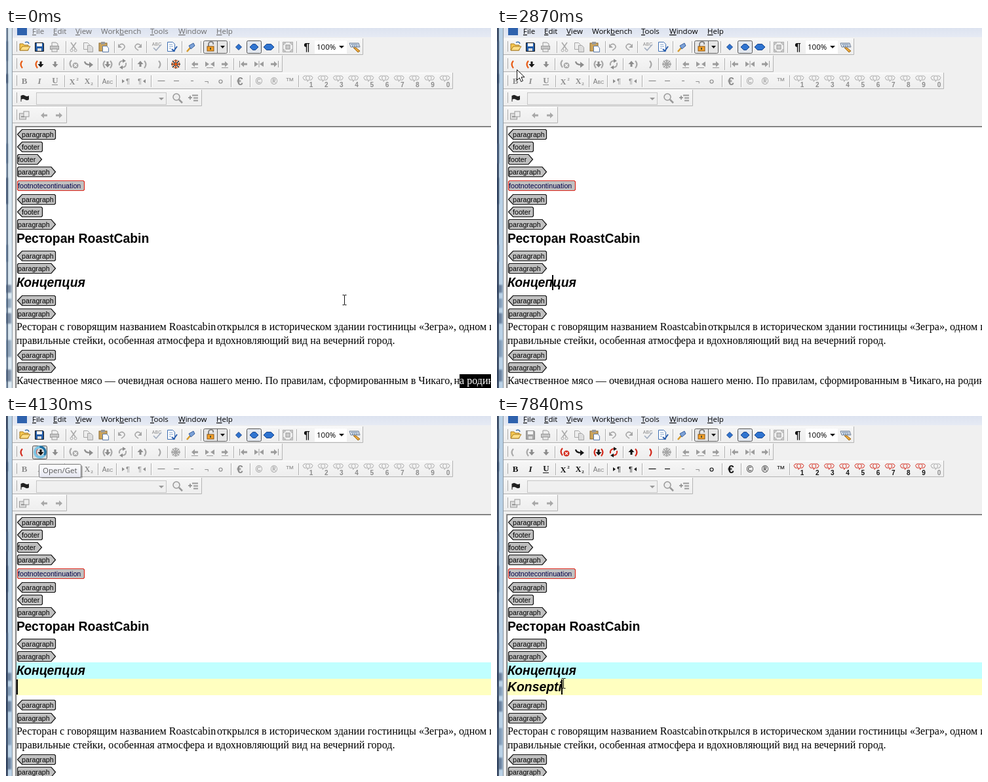
These frames come from a looping animation (740x548 px, 8000 ms). An HTML page:

```html
<!DOCTYPE html>
<html lang="ru">
<head>
<meta charset="utf-8">
<title>Editor</title>
<style>
html, body { margin: 0; width: 100%; height: 100%; overflow: hidden; background: #f0f0f0; }
svg { display: block; width: 740px; height: 548px; }
text { white-space: pre; }
.ui { font-family: "Open Sans", "Noto Sans", sans-serif; font-size: 11.5px; }
.sans { font-family: "Liberation Sans", Arial, sans-serif; }
.serif { font-family: "Liberation Serif", "Times New Roman", serif; font-size: 16.08px; }
.head { font-size: 19.4px; font-weight: bold; }
.on { --k: #151515; --c: #d32a1c; --o: #e85a13; --b: #245da8; }
.off { --k: #8c8c8c; --c: #a8a8a8; --o: #a8a8a8; --b: #a6a6a6; }
</style>
</head>
<body>
<svg id="stage" viewBox="0 0 740 548"></svg>
<script>
const LOOP = 8000, STEP = 70;
const K = 'var(--k)', C = 'var(--c)', O = 'var(--o)', B = 'var(--b)';

const rect = (x, y, w, h, fill, more = '') => `<rect x="${x}" y="${y}" width="${w}" height="${h}" fill="${fill}" ${more}/>`;
const path = (d, fill = 'none', stroke = 'none', w = 1, more = '') =>
  `<path d="${d}" fill="${fill}" stroke="${stroke}" stroke-width="${w}" ${more}/>`;
const text = (x, y, s, cls = 'ui', more = '') => `<text x="${x}" y="${y}" class="${cls}" ${more}>${s}</text>`;
const glyph = (x, y, s, size, fill = K, more = '') =>
  text(x, y, s, 'sans', `font-size="${size}" fill="${fill}" text-anchor="middle" ${more}`);
const at = (x, y, body, more = '') => `<g transform="translate(${x} ${y})" ${more}>${body}</g>`;
const group = (id, cls, body) => `<g id="${id}" class="${cls}">${body}</g>`;
const frame = (x, y, w, h, fill, stroke, more = '') => rect(x + .5, y + .5, w - 1, h - 1, fill, `stroke="${stroke}" ${more}`);

// Toolbar furniture
const bar = (y, end) => rect(10, y, end - 10, 24, 'url(#bar)') +
  path(`M10 ${y + 24.5}H${end - .5}V${y}`, 'none', '#b4b4b4') + path(`M10 ${y + .5}H${end - 1}`, 'none', '#fff') +
  path(`M16.5 ${y + 4}v16`, 'none', '#aaa');
const seps = (y, xs) => xs.map(x => path(`M${x + .5} ${y - 9}v18`, 'none', '#adadad') + path(`M${x + 1.5} ${y - 9}v18`, 'none', '#fff')).join('');

// Arrows and brackets
const down = (x, y, c = K) => at(x, y, path('M-1.5-4h3v4h3L0 5L-4.5 0h3z', c));
const up = (x, y, c = K) => at(x, y, path('M-1.5 4h3V0h3L0-5L-4.5 0h3z', c));
const left = (x, y, c = K) => at(x, y, path('M-5 0L0-4.5V-1.5H5V1.5H0V4.5z', c));
const right = (x, y, c = K) => at(x, y, path('M5 0L0-4.5V-1.5H-5V1.5H0V4.5z', c));
const open = (x, y, c = C) => at(x, y, path('M2-5Q-3 0 2 6', 'none', c, 2.2));
const shut = (x, y, c = C) => at(x, y, path('M-2-5Q3 0-2 6', 'none', c, 2.2));
const hop = (x, y) => at(x, y, path('M-6-4Q-5 1 2 1', 'none', K, 2.2) + path('M1-3.5L7 1L1 5.5z', K));
const turn = (x, y) => at(x, y, path('M-4-3C1-7 6-2 3 2Q1 4-1 5', 'none', '#a6a6a6', 1.6) + path('M-6-5v6h6z', '#a6a6a6'));
const diamond = (x, y, r) => at(x, y, path(`M${-r} 0L0 ${-r}L${r} 0L0 ${r}z`, '#2f74d0', '#1b468b'));
const hex = (x, y, w, h) => at(x, y, path(`M${-w} 0L${h - w} ${-h}H${w - h}L${w} 0L${w - h} ${h}H${h - w}z`, '#2f74d0', '#1b468b'));

const folder = at(28, 29, path('M-7-5h5l2 2h6v8H-7z', '#f5c64f', '#a97c22') + path('M-7 5L-3-1H9L5 5z', '#ffe08a', '#a97c22') + path('M1-7q5-2 6 2', 'none', '#3a6fb0', 1.5));
const disk = at(51, 29, path('M-6.5-6.5h12l1 1v12h-13z', B, K) + rect(-4, -6, 8, 5, '#f4f4f4') + rect(-3, 2, 6, 4, '#ddd'));
const printer = at(74, 29, path('M-4-2v-5h6l3 2v3', '#eee', '#999') + rect(-6.5, -1.5, 13, 5, '#c6c6c6', 'stroke="#999"') + rect(-4, 3, 8, 4, '#eee', 'stroke="#999"'));
const cut = at(103, 29, path('M-4-7L3 3M4-7L-3 3', 'none', '#aaa', 1.6) + '<circle cx="-3" cy="5" r="2" fill="none" stroke="#aaa"/><circle cx="3" cy="5" r="2" fill="none" stroke="#aaa"/>');
const copy = at(125, 29, path('M-6.5-6.5h6l3 3v7h-9z', '#eee', '#a5a5a5') + path('M-.5-2.5h5l3 3v7h-8z', '#ddd', '#a5a5a5'));
const paste = at(149, 29, rect(-7, -6, 12, 12, '#cda45a', 'stroke="#8a6a32"') + rect(-4, -8, 6, 4, '#999') + path('M-1.5-1.5h6l3 3v6h-9z', '#fff', '#5a79a8'));
const spell = glyph(230, 27, 'ABC', 7, '#888') + path('M225 30l4 4l8-9', 'none', '#a3aec0', 1.7);
const check = at(253, 29, path('M-6.5-7.5h8l3 3v11h-11z', '#fff', '#3d6eb2') + path('M-4-4h5M-4-1h6M-4 2h3', 'none', '#7d9dc8') + path('M0 3l3 3l5-7', 'none', '#2b5fae', 2));
const brush = at(282, 29, path('M-6 7L0 0', 'none', '#d59a2b', 2.5) + path('M-3-2L4-6L6-2L0 3z', '#7ca2d8', '#375f9d'));
const lock = frame(301, 19, 37, 20, '#e6e6e6', '#606060', 'rx="2"') + path('M322.5 19v20', 'none', '#666') +
  at(312, 29, path('M-3-1v-3q0-4 4-4t3 4', 'none', '#777', 1.7) + rect(-5, -1, 10, 7, '#f3a12b', 'stroke="#8a5514"') + rect(-1, 1, 2, 3, '#553')) + path('M327 27h7l-3.5 4z', '#111');
const full = at(430, 29, rect(-7.5, -7.5, 15, 15, '#eee', 'stroke="#aaa"') + rect(-3, -3, 6, 6, '#ccc', 'stroke="#999"') + path('M-6-3v-3h3M6-3v-3h-3M-6 3v3h3M6 3v3h-3', 'none', '#999'));
const keys = at(532, 29, path('M-8-6h14l2 6h-14z', '#dce5f0', '#6e7e95') + path('M-5-4h10M-4-1.5h10', 'none', '#67809f', 1.4, 'stroke-dasharray="2 1"') + path('M-2 1L5 8l3-2L2 1z', '#eaa63c', '#9b6a1c'));

const flake = at(259, 55, path('M0-7V7M-7 0H7M-5-5L5 5M5-5L-5 5', 'none', K, 1.3) +
  path('M-3-6L0-4L3-6M-3 6L0 4L3 6M-6-3L-4 0L-6 3M6-3L4 0L6 3', 'none', O, 1.3) + `<circle r="2.2" fill="${O}"/>`);
const refresh = at(178, 55, path('M-5 2Q-6-5 1-5M5-2Q6 5-1 5', 'none', C, 2) + path('M0-8l5 3l-5 3zM0 8l-5-3l5-3z', K));
const moves = [288, 311, 334, 363, 386, 409].map((x, i) => {
  const kind = i % 3, g = '#9c9c9c';
  const body = [left, (x, y) => at(x, y, path('M-7-4L-1 0L-7 4zM7-4L1 0L7 4z', g)), right][kind](x, 55, g);
  const mark = i < 3 ? `M${x - 5} 60.5h10` : `M${x + [-6.5, 0, 6.5][kind]} 50v10`;
  return body + path(mark, 'none', g);
}).join('');

const tagIcon = (x, n) => at(x, 79, path('M-8-3.5l2-2.5H5l2 2.5L5 0H1L-1 2.5V0h-5z', '#f4f4f4', C) +
  path('M-2-5l-2 2l2 2M1-5l2 2l-2 2', 'none', C) + glyph(4.5, 10.5, n, 10, K, 'font-weight="bold"'));
const serifGlyph = (x, y, s, size, more) => text(x, y, s, 'serif', `style="font-size:${size}px" font-weight="bold" text-anchor="middle" fill="${K}" ${more || ''}`);
const dash = (x, w) => path(`M${x - w / 2} 80.5h${w}`, 'none', K, 1.2);

const editRow = serifGlyph(28, 85, 'B', 13) + serifGlyph(51, 85, 'I', 13, 'font-style="italic"') +
  serifGlyph(75, 84, 'U', 13) + path('M70 86.5h9', 'none', K) +
  serifGlyph(101, 86, 'X', 12) + serifGlyph(109, 80, '2', 7) + serifGlyph(124, 85, 'X', 12) + serifGlyph(131, 87, '2', 7) +
  glyph(186, 85, '¶', 11) + path('M177 78l4 3l-4 3z', K) + glyph(204, 85, '¶', 11) + path('M213 78l-4 3l4 3z', K) +
  dash(237, 11) + dash(260, 8) + `<circle cx="327.5" cy="81.5" r="2.5" fill="none" stroke="${K}" stroke-width="1.2"/>` +
  glyph(357, 87, '€', 17, K, 'font-weight="bold"') + glyph(386, 86, '©', 14) + glyph(409, 86, '®', 14) + glyph(433, 85, '™', 13) +
  [...'123456789'].map((n, i) => tagIcon(461 + i * 23.2, n)).join('') +
  open(98, 54) + at(106, 57, `<circle r="4.5" fill="${C}"/>` + path('M-2-2L2 2M2-2L-2 2', 'none', '#fff', 1.4)) + hop(126, 55) +
  open(149, 55) + down(155, 55) + shut(161, 55) + refresh + up(205, 55) + shut(213, 55) + shut(235, 55);

const menu = [[40, 'File', 0], [72, 'Edit', 0], [106, 'View', 0], [145, 'Workbench', 4], [220, 'Tools', 0], [263, 'Window', 0], [321, 'Help', 0]]
  .map(([x, s, i]) => text(x, 9, `${s.slice(0, i)}<tspan text-decoration="underline">${s[i]}</tspan>${s.slice(i + 1)}`)).join('');

// Document tags: 'L' points left, 'R' points right, 'X' is a plain box
const tag = (kind, y, name, w) => {
  const r = 17 + w, shape = {
    L: `M17.5 ${y}l7-7.5H${r - 2}l1.5 1.5v12l-1.5 1.5H24.5z`,
    R: `M17.5 ${y - 6}l1.5-1.5H${r - 7}l6.5 7.5l-6.5 7.5H19l-1.5-1.5z`,
    X: `M17.5 ${y - 6}l1.5-1.5H${r - 2}l1.5 1.5v12l-1.5 1.5H19l-1.5-1.5z`
  }[kind];
  const line = kind === 'X' ? '#e0281c' : '#101010';
  return path(shape, '#c0c0c0', line, 1.2) +
    text(kind === 'L' ? 24 : 18, y + 4, name, 'sans', `font-size="10.7" fill="${kind === 'X' ? '#000048' : '#000'}"`);
};
const par = (kind, y) => tag(kind, y, 'paragraph', 59);
const foot = (kind, y) => tag(kind, y, 'footer', kind === 'L' ? 39 : 38);

const upper = par('L', 162) + foot('L', 181) + foot('R', 200) + par('R', 219) + tag('X', 240, 'footnotecontinuation', 103) +
  par('L', 261) + foot('L', 280) + par('R', 299) + text(16, 327, 'Ресторан RoastCabin', 'sans head') + par('L', 347) + par('R', 366);
const lower = par('L', 415) + par('R', 435) +
  text(16, 460, 'Ресторан с говорящим названием Roastcabin', 'serif') +
  text(322, 460, 'открылся в историческом здании гостиницы', 'serif') + text(630, 460, '«Зегра»,', 'serif') + text(691, 460, 'одном из', 'serif') +
  text(16, 481, 'правильные стейки, особенная атмосфера и вдохновляющий вид на вечерний город.', 'serif') +
  par('L', 498) + par('R', 517) +
  text(16, 542, 'Качественное мясо — очевидная основа нашего меню. По правилам, сформированным в Чикаго,', 'serif') +
  text(683.5, 542, 'н', 'serif') +
  `<g id="sel">${rect(692, 527, 48, 21, '#000')}</g>` + text(692, 542, 'а родине', 'serif', 'id="selText"');

const edge = [[20, 30], [70, 14], [176, 30], [228, 40], [330, 26], [391, 12], [412, 14], [434, 16], [475, 26], [520, 18]]
  .map(([y, h], i) => rect(0, y, i > 4 ? 8 : 3, h, i % 2 ? '#24395c' : '#506a8c', `opacity="${i > 4 ? .5 : .65}" filter="url(#soft)"`)).join('');

const $ = id => document.getElementById(id);
$('stage').innerHTML = `
<defs>
  <linearGradient id="menuFill" x2="0" y2="1"><stop stop-color="#dde3f0"/><stop offset="1" stop-color="#e6eaf4"/></linearGradient>
  <linearGradient id="bar" x2="0" y2="1"><stop stop-color="#f6f6f6"/><stop offset="1" stop-color="#eee"/></linearGradient>
  <linearGradient id="tipFill" x2="0" y2="1"><stop stop-color="#fff"/><stop offset="1" stop-color="#e4e5f0"/></linearGradient>
  <filter id="soft" x="-1" width="3"><feGaussianBlur stdDeviation="1.2"/></filter>
</defs>` +
  rect(0, 0, 740, 548, '#f0f0f0') + rect(0, 0, 10, 548, '#d8e6f0', 'id="side"') + rect(0, 0, 3, 548, '#8b9db2', 'id="rim"') + edge +
  path('M2.5 0V548', 'none', '#45566b') + path('M9.5 0V548', 'none', '#8e9aa5') +
  rect(10, 0, 730, 14, 'url(#menuFill)') + rect(17, -3, 15, 14, '#2f62ad') + `<g id="menu">${menu}</g>` +
  bar(16, 545) + bar(42, 422) + bar(68, 682) + bar(94, 299) + bar(120, 93) +
  seps(29, [91, 165, 214, 268, 297, 341, 416, 443]) + seps(55, [88, 140, 192, 246, 273, 347]) +
  seps(81, [89, 140, 168, 221, 343, 372, 446]) +
  folder + group('save', 'on', disk) + printer + cut + copy + paste + turn(177, 29) +
  `<g transform="translate(402 0) scale(-1 1)">${turn(201, 29)}</g>` + spell + check + brush + lock +
  diamond(355, 29, 4.5) + frame(367, 19, 23, 20, '#e2e7ee', '#555', 'rx="2"') + hex(378.5, 29, 6.5, 4.5) + hex(401, 29, 8, 4.5) +
  full + glyph(459, 35, '¶', 17, '#111', 'font-weight="bold"') + rect(471, 19, 49, 20, '#fff') + text(474, 33, '100%') + path('M508 27h8l-4 4z', '#111') + keys +
  `<g id="button">${frame(40, 45, 23, 21, '#d9d9d9', '#555', 'rx="2"')}</g>` +
  group('getRow', 'on', open(23, 55, O) + open(46, 55, O) + down(53, 55)) + `<g class="off">${down(75, 55)}</g>` +
  group('flake', 'on', flake) + moves + group('editRow', 'off', editRow) +
  glyph(155, 85, 'A<tspan font-size="7">BC</tspan>', 10, '#777') +
  `<g class="off">${dash(284, 4)}${glyph(306, 85, '¬', 11, '#777')}${tagIcon(670, '0')}</g>` +
  path('M23 103v9', 'none', '#222') + path('M23 103q3-2 6 0t6 0v6q-3 2-6 0t-6 0z', '#222') +
  frame(46, 98, 199, 19, '#f0f0f0', '#c6c6c6') + path('M233 106h8l-4 4z', '#999') +
  '<circle cx="260" cy="105" r="5" fill="#eee" stroke="#999" stroke-width="1.5"/>' + path('M264 109l5 5', 'none', '#999', 2.5) +
  path('M284 102.5h9M286 106.5h7M286 110.5h7', 'none', '#999', 2) + path('M278 106h6M281 103v6', 'none', '#888', 1.5) +
  at(28, 133, rect(-7.5, -3, 10, 9, '#ddd', 'stroke="#999"') + rect(-1, -6, 8, 8, '#eee', 'stroke="#999"') + path('M-5 2h5', 'none', '#999', 2)) +
  left(58, 133, '#a8a8a8') + right(81, 133, '#a8a8a8') +
  rect(14, 149, 726, 399, '#a0a0a0') + rect(15, 150, 725, 398, '#696969') + rect(16, 151, 724, 397, '#fff') +
  `<g id="bands">${rect(16, 375, 724, 25, '#c0ffff') + rect(16, 400, 724, 25, '#ffffc0')}</g>` +
  upper + text(16, 394, 'Концепция', 'sans head', 'font-style="italic"') + `<g id="lower">${lower}</g>` +
  text(16, 419, '', 'sans head', 'id="typed" font-style="italic"') + rect(0, 0, 2, 23, '#000', 'id="caret"') +
  `<g id="tip">${rect(53, 75, 64, 20, '#000', 'rx="3" opacity=".25"') + frame(50, 73, 65, 21, 'url(#tipFill)', '#767676', 'rx="2"') + text(56, 87, 'Open/Get', 'ui', 'fill="#575757"')}</g>` +
  `<g id="mouse">
    <g id="beam">${path('M-3.5-7.5h2.5l.5.5l.5-.5h2.5M-3.5 7.5h2.5l.5-.5l.5.5h2.5M-.5-7v14', 'none', '#111')}</g>
    <g id="arrow">${path('M.5.5V16.5l3.8-3.6l2.4 5.7l2.8-1.2L7.1 11.8h5z', '#fff', '#111')}</g>
  </g>
  <g id="busy" transform="translate(52 55)"><circle r="8" fill="none" stroke="#7cc4e4" stroke-width="4"/>
    <circle id="spin" r="8" fill="none" stroke="#1e6c9e" stroke-width="3" stroke-dasharray="18 33"/></g>`;

const route = [
  [0, 517, 414], [280, 400, 392], [490, 250, 381], [700, 135, 434], [840, 95, 412], [1050, 87, 390], [1190, 86, 389],
  [2100, 86, 389], [2450, 132, 200], [2800, 36, 70], [2870, 30, 63], [2940, 34, 62], [3220, 51, 56],
  [4690, 51, 56], [4900, 78, 230], [5110, 102, 407], [LOOP, 102, 407]
];
const keyTimes = [5810, 5950, 6090, 6230, 6510, 6650, 6790, 6860];
const caretOn = [[1330, 1820], [2380, 3010], [3500, 4620], [5110, 5600], [5810, 7350], [7840, LOOP]];

const between = (t, a, b) => t >= a && t < b;
const show = (id, yes) => { $(id).style.display = yes ? '' : 'none'; };
const state = (id, yes) => $(id).setAttribute('class', yes ? 'on' : 'off');

function mouseAt(t) {
  const i = Math.max(1, route.findIndex(p => p[0] > t));
  const [t0, x0, y0] = route[i - 1], [t1, x1, y1] = route[i];
  const f = (t - t0) / (t1 - t0);
  return [Math.round(x0 + (x1 - x0) * f), Math.round(y0 + (y1 - y0) * f)];
}

function draw(ms) {
  const t = Math.floor(ms / STEP) * STEP;
  const focus = t >= 1330, split = t >= 4130, editing = t >= 4200;

  $('menu').setAttribute('fill', focus ? '#000' : '#6d6d6d');
  $('side').setAttribute('fill', focus ? '#b9d1e6' : '#d8e6f0');
  $('rim').setAttribute('fill', focus ? '#3d4d68' : '#8b9db2');
  show('sel', !focus);
  $('selText').setAttribute('fill', focus ? '#000' : '#fff');
  show('bands', split);
  $('lower').setAttribute('transform', `translate(0 ${split ? 25 : 0})`);

  state('flake', !focus);
  state('save', !editing);
  state('getRow', !editing);
  $('getRow').style.setProperty('--o', editing ? '' : t >= 3010 ? '#d32a1c' : '#e85a13');
  state('editRow', editing);

  show('button', between(t, 3220, 4200));
  $('button').style.opacity = t >= 4060 ? 1 : .45;
  show('tip', between(t, 3430, 4200));
  $('tip').style.opacity = Math.min(1, (t - 3360) / 350);

  const typed = 'Konsepti'.slice(0, keyTimes.filter(k => t >= k).length);
  if ($('typed').textContent !== typed) $('typed').textContent = typed;
  const end = typed ? $('typed').getComputedTextLength() : 0;
  $('caret').setAttribute('x', split ? Math.round(15.5 + end) : 84);
  $('caret').setAttribute('y', split ? 401 : 376);
  show('caret', caretOn.some(([a, b]) => between(t, a, b)));

  const [x, y] = mouseAt(t), busy = between(t, 4130, 4340);
  $('mouse').setAttribute('transform', `translate(${x} ${y})`);
  show('mouse', !busy);
  show('beam', y > 150);
  show('arrow', y <= 150);
  show('busy', busy);
  $('spin').setAttribute('transform', `rotate(${t * .5 % 360})`);
}

function tick() {
  draw(performance.now() % LOOP);
  requestAnimationFrame(tick);
}
draw(0);
requestAnimationFrame(tick);
</script>
</body>
</html>
```
